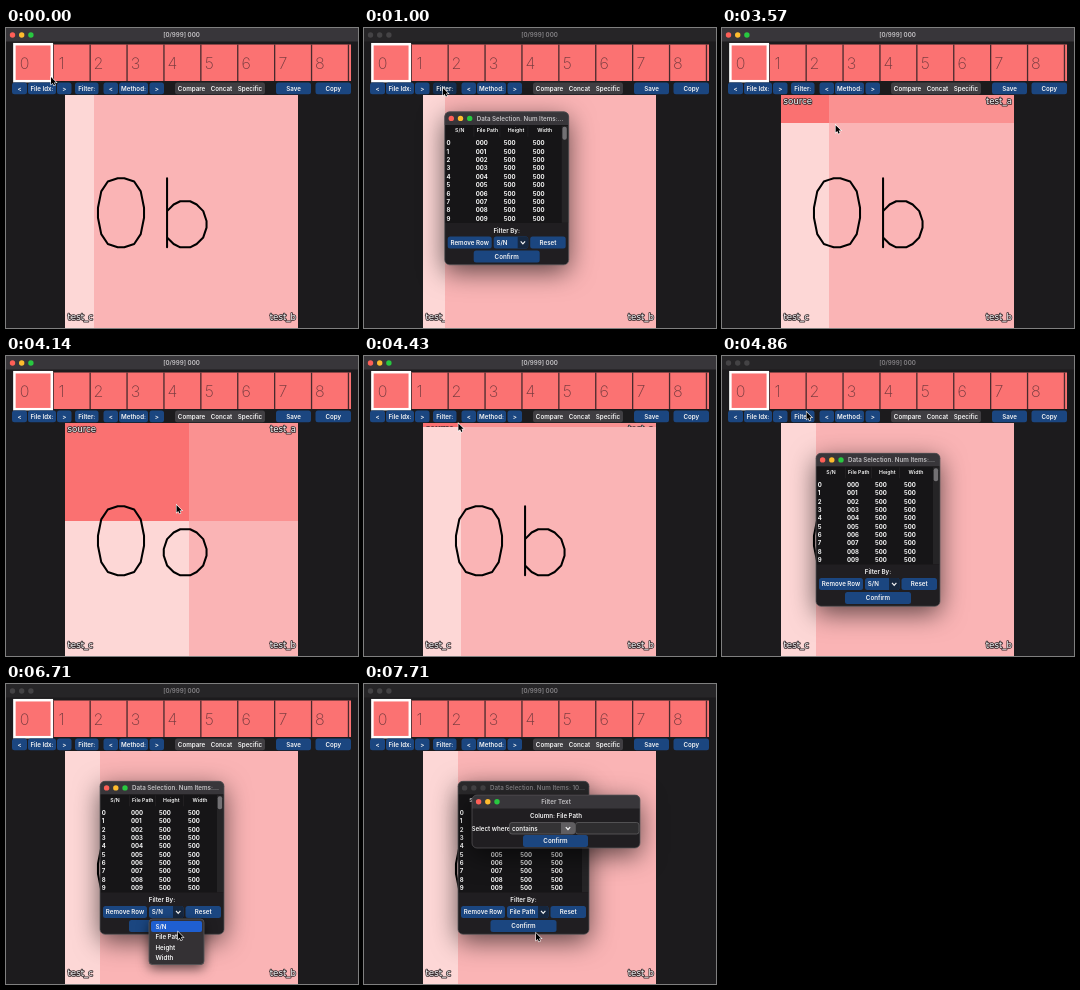
Write an HTML page with a canvas that moves like this. It is 352 px wide and 300 px high and loops after 8 s.

```html
<!DOCTYPE html>
<html lang="en">
<head>
<meta charset="utf-8">
<title>Image comparison viewer</title>
<style>
html, body { margin: 0; width: 100%; height: 100%; overflow: hidden; background: #1c1b1d; }
canvas { display: block; width: 352px; height: 300px; }
</style>
</head>
<body>
<canvas id="stage"></canvas>
<script>
const W = 352, H = 300, LOOP = 8000, STEP = 1000 / 7;
const canvas = document.getElementById('stage');
const ctx = canvas.getContext('2d');
const dpr = window.devicePixelRatio || 1;
canvas.width = W * dpr;
canvas.height = H * dpr;

const BLUE = '#1b4680', HOVER = '#142f52', CAP = '#16273f', WHITE = '#f4f4f4';
const LIGHTS = ['#fe5f57', '#febc2e', '#28c840'];
const VIEW = { x: 59, y: 67, r: 292, b: 300 };

// [time, x, y]
const cursorPath = [
  [0, 45, 49], [140, 45, 49], [430, 84, 72], [640, 79, 60], [1290, 79, 60],
  [1720, 140, 150], [2290, 142, 160], [2860, 86, 89], [3430, 86, 89],
  [3571, 113.5, 97], [3900, 228, 212], [4143, 170.5, 149], [4430, 94, 67],
  [4570, 84.5, 56], [4950, 84.5, 56], [5700, 171, 226], [6000, 171, 226],
  [6600, 172, 246], [6860, 172, 250], [7000, 172, 250], [7140, 172, 244],
  [7430, 172, 244], [7710, 172, 249]
];
const splitPath = [
  [0, 88, 67], [300, 88, 67], [500, 81, 67], [3430, 81, 67], [3571, 107, 95],
  [3930, 222, 207], [4143, 183, 165], [4440, 94, 67]
];

function along(path, t) {
  const i = path.findIndex(p => p[0] > t);
  if (i < 0) return path[path.length - 1].slice(1);
  const [t0, x0, y0] = path[i - 1], [t1, x1, y1] = path[i];
  const k = (t - t0) / (t1 - t0);
  return [x0 + (x1 - x0) * k, y0 + (y1 - y0) * k];
}

function rect(x, y, w, h, color) {
  ctx.fillStyle = color;
  ctx.fillRect(x, y, w, h);
}

function box(x, y, w, h, color, radius = 2.5, border) {
  ctx.beginPath();
  ctx.roundRect(x, y, w, h, radius);
  ctx.fillStyle = color;
  ctx.fill();
  if (border) {
    ctx.strokeStyle = border;
    ctx.lineWidth = 0.8;
    ctx.stroke();
  }
}

function shadowed(blur, offset, x, y, w, h, color, radius) {
  ctx.save();
  ctx.shadowColor = 'rgba(0,0,0,.62)';
  ctx.shadowBlur = blur * dpr;
  ctx.shadowOffsetY = offset * dpr;
  box(x, y, w, h, color, radius);
  ctx.restore();
}

function text(str, x, y, { size = 6.2, weight = 600, color = WHITE, align = 'center' } = {}) {
  ctx.font = `${weight} ${size}px Inter, sans-serif`;
  ctx.textAlign = align;
  ctx.textBaseline = 'alphabetic';
  ctx.fillStyle = color;
  ctx.fillText(str, x, y + size * 0.36);
}

function button(label, x, y, w, h = 12, color = BLUE) {
  box(x, y, w, h, color);
  text(label, x + w / 2, y + h / 2);
}

function chevron(x, y) {
  ctx.beginPath();
  ctx.moveTo(x - 2.2, y - 1.2);
  ctx.lineTo(x, y + 1.2);
  ctx.lineTo(x + 2.2, y - 1.2);
  ctx.strokeStyle = WHITE;
  ctx.lineWidth = 1.2;
  ctx.stroke();
}

function lights(x, y, active) {
  LIGHTS.forEach((color, i) => {
    ctx.beginPath();
    ctx.arc(x + i * 9.2, y, 2.7, 0, 7);
    ctx.fillStyle = active ? color : '#444345';
    ctx.fill();
  });
}

// Stroke-font glyphs on a 21-unit cap height, baseline at 0.
const ZERO = new Path2D('M9 21L6 20 4 17 3 12V9L4 4 6 1 9 0H11L14 1 16 4 17 9V12L16 17 14 20 11 21Z');
const BOWL = 'M15 11L13 13 11 14H8L6 13 4 11 3 8V6L4 3 6 1 8 0H11L13 1 15 3';
const LETTERS = {
  a: { path: new Path2D(BOWL + 'M15 14V0') },
  b: { path: new Path2D(BOWL + 'M15 21V0'), mirrored: true },
  c: { path: new Path2D(BOWL) }
};

function glyphs(letter) {
  ctx.save();
  ctx.translate(82.1, 219.3);
  ctx.scale(3.29, -3.29);
  ctx.strokeStyle = '#000';
  ctx.lineWidth = 0.62;
  ctx.lineCap = ctx.lineJoin = 'round';
  ctx.stroke(ZERO);
  if (letter) {
    const { path, mirrored } = LETTERS[letter];
    ctx.translate(mirrored ? 39 : 20, 0);
    if (mirrored) ctx.scale(-1, 1);
    ctx.stroke(path);
  }
  ctx.restore();
}

function quadrant(x, y, r, b, color, letter, label, right, bottom) {
  if (r <= x || b <= y) return;
  ctx.save();
  ctx.beginPath();
  ctx.rect(x, y, r - x, b - y);
  ctx.clip();
  rect(x, y, r - x, b - y, color);
  glyphs(letter);
  ctx.font = '8.6px "DejaVu Sans", sans-serif';
  ctx.textAlign = right ? 'right' : 'left';
  ctx.textBaseline = 'alphabetic';
  ctx.lineJoin = 'round';
  ctx.lineWidth = 1.6;
  ctx.strokeStyle = '#33272a';
  ctx.fillStyle = '#fff';
  const tx = right ? 290 : 61.5, ty = bottom ? 292 : 76;
  ctx.strokeText(label, tx, ty);
  ctx.fillText(label, tx, ty);
  ctx.restore();
}

function viewer(t) {
  const [sx, sy] = along(splitPath, t).map(Math.round);
  const { x, y, r, b } = VIEW;
  quadrant(x, y, sx, sy, '#fa7171', '', 'source', false, false);
  quadrant(sx, y, r, sy, '#fa9191', 'a', 'test_a', true, false);
  quadrant(x, sy, sx, b, '#fdd7d6', 'c', 'test_c', false, true);
  quadrant(sx, sy, r, b, '#fab4b5', 'b', 'test_b', true, true);
}

function mainWindow(active, filterHovered) {
  rect(0, 0, W, H, '#1c1b1d');
  rect(0, 0, W, 13.5, active ? '#38363a' : '#262527');
  lights(6.5, 7, active);
  text('[0/999] 000', 175.5, 7, { color: active ? '#c4c2c5' : '#838184' });

  rect(8, 16.5, 337, 36.5, '#fb7272');
  for (let i = 0; i < 9; i++) {
    const x = 10 + i * 36.9;
    rect(x + 36.6, 16.5, 1.3, 36.5, '#472a2d');
    text(i, x + 8.7, 35.5, { size: 16, weight: 200, color: '#743a3e' });
  }
  ctx.strokeStyle = '#fff';
  ctx.lineWidth = 2.5;
  ctx.strokeRect(8.4, 16.2, 37.4, 37);

  [['<', 6, 15], ['File Idx:', 22, 28], ['>', 51, 14.5], ['Filter:', 69, 23.5],
   ['<', 97.5, 14.5], ['Method:', 113, 29], ['>', 143.5, 14.5],
   ['Save', 270, 35], ['Copy', 309.5, 35.5]
  ].forEach(([label, x, w]) =>
    button(label, x, 54.6, w, 11.6, filterHovered && label === 'Filter:' ? HOVER : BLUE));
  box(169, 54.6, 90, 11.6, '#403e42');
  text('Compare', 185.5, 60.4);
  text('Concat', 215.5, 60.4);
  text('Specific', 244, 60.4);
}

function frame(x, y, w, h, bar, active) {
  shadowed(26, 7, x, y, w, h, '#201e21', 5);
  box(x, y, w, bar, active ? '#38363a' : '#2a292b', [5, 5, 0, 0]);
  lights(x + 6.6, y + bar / 2, active);
}

function outline(x, y, w, h) {
  ctx.beginPath();
  ctx.roundRect(x, y, w, h, 5);
  ctx.strokeStyle = '#5a585b';
  ctx.lineWidth = 0.7;
  ctx.stroke();
}

function dataWindow(x, y, { column = 'S/N', w = 124, active = true, title = 'Data Selection. Num Items:...' } = {}) {
  const k = w / 124, extra = w - 124;
  ctx.save();
  ctx.translate(x, y);
  frame(0, 0, w, 153, 13.2, active);
  text(title, 32, 6.8, { align: 'left', color: active ? '#c2c0c3' : '#838184' });

  rect(0.5, 13.2, w - 1, 98, '#161517');
  [29, 55, 83].forEach(c => rect(c * k, 14, 0.5, 11, '#2c2b2d'));
  ['S/N', 'File Path', 'Height', 'Width'].forEach((label, i) =>
    text(label, [15, 42.7, 71.3, 100][i] * k, 18.6, { size: 5.2 }));
  for (let i = 0; i < 10; i++) {
    [i, '00' + i, 500, 500].forEach((cell, j) =>
      text(cell, [1.7, 31, 59, 88][j] * k, 31.3 + i * 8.38, { align: 'left', size: 6, weight: 700 }));
  }
  rect(w - 7, 14, 6.5, 97, '#252426');
  box(w - 6.3, 15, 4.4, 13, '#727073', 2);

  text('Filter By:', w / 2, 118.6);
  button('Remove Row', 3, 124.8, 44);
  box(49, 124.8, 34.5 + extra, 12, BLUE);
  box(73 + extra, 124.8, 10.5, 12, CAP, [0, 2.5, 2.5, 0]);
  text(column, 51.8, 130.8, { align: 'left' });
  chevron(78.2 + extra, 130.8);
  button('Reset', 85.5 + extra, 124.8, 35.5);
  button('Confirm', 29 + extra / 2, 138.8, 66);
  outline(0, 0, w, 153);
  ctx.restore();
}

function columnMenu(selected) {
  shadowed(12, 4, 143, 235, 55, 45.5, '#343134', 3.5);
  box(143, 235, 55, 45.5, '#343134', 3.5, '#5a585b');
  box(145, 237 + selected * 10.5, 51, 11, '#1f5fd0', 2);
  ['S/N', 'File Path', 'Height', 'Width'].forEach((label, i) =>
    text(label, 149.5, 242.5 + i * 10.4, { align: 'left' }));
}

function filterDialog() {
  frame(108, 111, 168, 53, 13.5, true);
  text('Filter Text', 192, 117.8, { color: '#c2c0c3' });
  text('Column: File Path', 192, 132);
  text('Select where', 107.5, 144.5, { align: 'left' });
  box(145.5, 138.5, 65.5, 11.5, '#343335', 2.5, '#5e5c5f');
  box(197, 138.5, 14, 11.5, '#605e61', [0, 2.5, 2.5, 0]);
  text('contains', 148, 144.3, { align: 'left' });
  chevron(204, 144.3);
  box(211.5, 138.5, 63.5, 11.5, '#2e2d2f', 2.5, '#5e5c5f');
  button('Confirm', 159, 151, 65, 12);
  outline(108, 111, 168, 53);
}

const ARROW = new Path2D('M0 0V7.4L1.7 5.9 2.9 8.5 4.1 7.9 3 5.4H5.3Z');

function pointer(t) {
  ctx.save();
  ctx.translate(...along(cursorPath, t));
  ctx.strokeStyle = '#fff';
  ctx.lineWidth = 1.1;
  ctx.stroke(ARROW);
  ctx.fillStyle = '#000';
  ctx.fill(ARROW);
  ctx.restore();
}

function draw(t) {
  const first = t > 850 && t < 3280;
  const second = t > 4700;
  const picked = t > 6990;
  const dialog = t > 7420;
  ctx.setTransform(dpr, 0, 0, dpr, 0, 0);
  mainWindow(!first && !second, t > 640 && t < 1430);
  viewer(t);
  if (first) dataWindow(80.7, 83.8);
  if (second && !picked) dataWindow(94, 97.3);
  if (picked) {
    dataWindow(94, 97.3, {
      column: 'File Path', w: 131, active: !dialog, title: 'Data Selection. Num Items: 10...'
    });
  }
  if (t > 5990 && !picked) columnMenu(t > 6800 ? 1 : 0);
  if (dialog) filterDialog();
  pointer(t);
}

const start = performance.now();
function tick() {
  const t = (performance.now() - start) % LOOP;
  draw(Math.min(54, Math.floor((t + 5) / STEP)) * STEP);
  requestAnimationFrame(tick);
}
tick();
</script>
</body>
</html>
```
